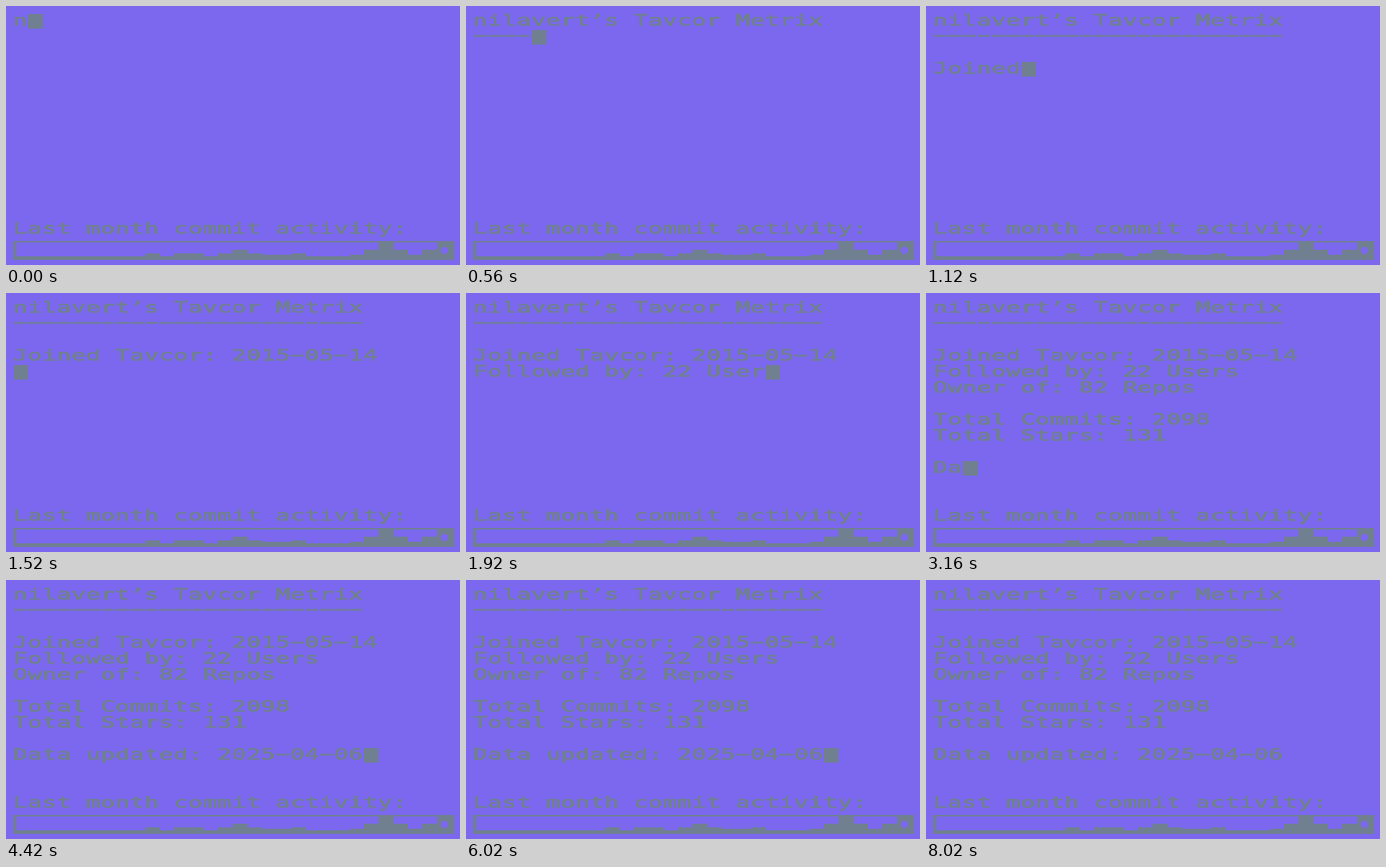
Recreate the animation shown at these times as an HTML page. Size 622x356 px, loop 8420 ms.

```html
<!DOCTYPE html>
<html lang="en">
<head>
<meta charset="utf-8">
<title>Commit metrics terminal</title>
<style>
  html, body { margin: 0; width: 100%; height: 100%; overflow: hidden; background: #7b68ee; }
  svg { display: block; fill: #708090; }
  text {
    font: 22px "DejaVu Sans Mono", monospace;
    letter-spacing: 0.0882px;
    white-space: pre;
    stroke: #708090;
    stroke-width: 0.7px;
  }
</style>
</head>
<body>
<svg width="622" height="356" viewBox="0 0 622 356">
  <!-- wide terminal face: every cell is 20 x 22 -->
  <g id="screen" transform="translate(9 10) scale(1.5 1)"></g>
  <rect id="cursor" width="20" height="20"/>
  <path d="M9 323H614V349H9zM14 325V344H611V325z" fill-rule="evenodd"/>
  <g id="bars"></g>
  <circle cx="600" cy="336" r="5" fill="#7b68ee"/>
</svg>
<script>
const CELL = 20, ROW = 22, PAD = 10;
const STEP = 20, BLINK = 400, LOOP = 8420;
const LABEL_ROW = 13, RULE_ROW = 1;

const lines = [
  "nilavert\u2019s Tavcor Metrix",
  "\u2212".repeat(24),
  "",
  "Joined Tavcor: 2015\u221205\u221214",
  "Followed by: 22 Users",
  "Owner of: 82 Repos",
  "",
  "Total Commits: 2098",
  "Total Stars: 131",
  "",
  "Data updated: 2025\u221204\u221206"
];
const total = lines.join("\n").length;
const typedEnd = (total - 1) * STEP;

const byId = id => document.getElementById(id);
const cursor = byId("cursor");

function add(parent, tag, attrs) {
  const el = document.createElementNS("http://www.w3.org/2000/svg", tag);
  for (const key in attrs) el.setAttribute(key, attrs[key]);
  return parent.appendChild(el);
}

function addRow(row) {
  const lift = row === RULE_ROW ? 1 : 0;
  return add(byId("screen"), "text", { x: 0, y: row * ROW + 17 - lift });
}

const rows = lines.map((_, i) => addRow(i));
addRow(LABEL_ROW).textContent = "Last month commit activity:";

// [first day, days, top]
const bars = [
  [9, 1, 340], [11, 2, 340], [14, 1, 340], [15, 1, 335], [16, 1, 340],
  [17, 2, 342], [19, 1, 340], [23, 1, 342], [24, 1, 335], [25, 1, 324],
  [26, 1, 335], [27, 1, 342], [28, 1, 335], [29, 1, 324]
];
for (const [day, days, top] of bars) {
  add(byId("bars"), "rect", {
    x: PAD + day * CELL, y: top, width: days * CELL, height: 348 - top
  });
}

let shown = -1;
function type(count) {
  if (count === shown) return;
  shown = count;
  let left = count, row = 0, col = 0;
  lines.forEach((line, i) => {
    const n = Math.max(0, Math.min(left, line.length));
    rows[i].textContent = line.slice(0, n);
    if (left >= 0) { row = i; col = n; }
    left -= line.length + 1;
  });
  cursor.setAttribute("x", PAD + col * CELL);
  cursor.setAttribute("y", PAD + 1 + row * ROW);
}

function draw(time) {
  const t = Math.max(0, time) % LOOP;
  type(Math.min(total, Math.floor(t / STEP) + 1));
  const beat = Math.floor((t - typedEnd - STEP) / BLINK);
  cursor.setAttribute("visibility", beat > 0 && beat % 2 ? "hidden" : "visible");
}

const start = performance.now();
function tick(now) {
  draw(now - start);
  requestAnimationFrame(tick);
}
draw(0);
requestAnimationFrame(tick);
</script>
</body>
</html>
```
